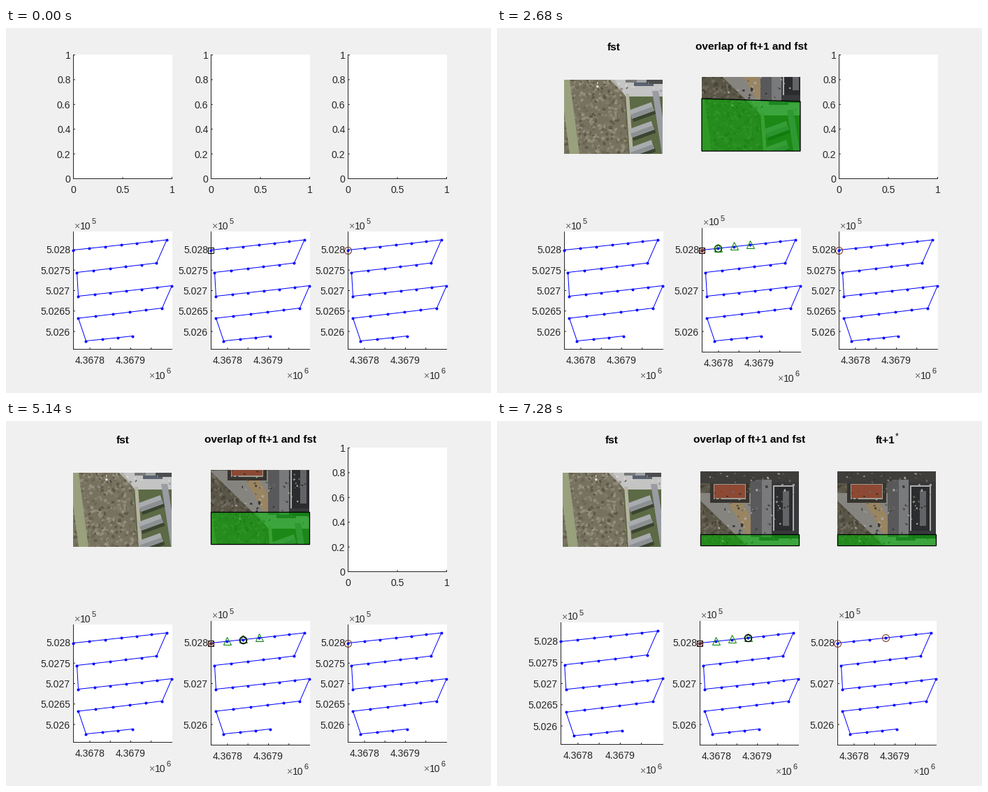
Animation, 694 px wide and 522 px high, one loop 8000 ms. Source, as a matplotlib script:

```python
import numpy as np
import matplotlib.pyplot as plt
from matplotlib.animation import FuncAnimation
from matplotlib.collections import PolyCollection
from matplotlib.patches import Polygon, Rectangle

W, H, DPI = 694, 522, 100
PX = 72 / DPI
LOOP, STEP = 8000, 40
STARTS = (1400, 3530, 6210)
SIDE, VIEW_H = 141, 106
INK, BLUE, GREEN, BROWN = "#262626", "#0000ff", "#008000", "#6b2a1a"

plt.rcParams["font.family"] = "Liberation Sans"
fig = plt.figure(figsize=(W / DPI, H / DPI), dpi=DPI, facecolor="#f0f0f0")
ax = fig.add_axes([0, 0, 1, 1])
ax.set_xlim(-0.5, W - 0.5)
ax.set_ylim(H - 0.5, -0.5)
ax.axis("off")

scenes = [[] for _ in range(4)]
current = scenes[0]
layer = 0


def add(artist):
    global layer
    layer += 1
    artist.set_zorder(layer)
    artist.set_visible(False)
    current.append(artist)
    return artist


def text(x, y, s, ha="center", size=14, weight="normal", color=INK):
    add(ax.text(x, y, s, ha=ha, va="baseline", fontsize=size * PX,
                weight=weight, color=color))


def title(x, s):
    text(x, 31, s, size=15.4, weight="bold", color="black")


def line(xs, ys, color=INK, **kw):
    add(ax.plot(xs, ys, color=color, lw=PX, snap=False, **kw)[0])


def mark(p, shape, color="black", size=10, width=1):
    add(ax.plot(p[0], p[1], shape, ms=size * PX, mfc="none", mec=color,
                mew=width * PX, snap=False)[0])


def frame(x0, w, top, bottom, xticks, yticks):
    add(ax.add_patch(Rectangle((x0 - 0.5, top - 0.5), w + 1, bottom - top + 1,
                               fc="white", lw=0, snap=False)))
    line([x0, x0], [top, bottom])
    line([x0, x0 + w], [bottom, bottom])
    for x in xticks:
        line([x, x], [bottom, bottom - 2])
    for y in yticks:
        line([x0, x0 + 2], [y, y])


def empty_axes(x0):
    xs, ys = np.linspace(x0, x0 + SIDE, 3), np.linspace(215, 38, 6)
    frame(x0, SIDE, 38, 215, xs, ys)
    for i, x in enumerate(xs):
        text(x, 235, f"{i / 2:g}")
    for i, y in enumerate(ys):
        text(x0 - 4, y + 5.5, f"{i / 5:g}", "right")


def sweep(x0, y0, x1, y1, n):
    """One pass of the flight, drifting slightly to the right."""
    t = np.linspace(0, 1, n)
    return np.column_stack([x0 + (x1 - x0) * t + 1.5 * np.sin(np.pi * t),
                            y0 + (y1 - y0) * t])


# Relative to the middle of the left axis
ROUTE = np.vstack([sweep(0, -58, 133.5, -72.5, 7),
                   sweep(119, -39.5, 5, -26, 6),
                   sweep(7, 8, 141, -7, 7),
                   sweep(127, 25, 7, 39.5, 6),
                   sweep(18, 72, 84.5, 65, 4)])


def power(x, y, exponent):
    text(x, y, "×", "left", color="#666666")
    text(x + 8.5, y, "10", "left")
    text(x + 25.5, y - 7, exponent, "left", 11)


def route_axes(x0, w=SIDE, top=291, bottom=459, every=1):
    """Draw the flight route; return its points in stage pixels."""
    k = w / SIDE
    pts = ROUTE * k + (x0, 375)
    xs = x0 + (23.5 + 29.25 * np.arange(4)) * k
    ys = 375 + 29.25 * k * np.arange(-2, 3, every)
    frame(x0, w, top, bottom, xs, ys)
    for i, x in enumerate(xs[::2]):
        text(x, bottom + 20.5, f"{4.3678 + i / 1e4:.4f}")
    for i, y in enumerate(ys):
        text(x0 - 4.5, y + 5.5, f"{5.028 - 0.0005 * every * i:g}", "right")
    power(x0 + 1, top - 4, "5")
    power(x0 + w - 33, bottom + 42, "6")
    line(*pts.T, color=BLUE, marker="o", ms=4 * PX, mew=0)
    return pts


def candidates(pts, active):
    """Start square, tried photos as triangles, the current one circled."""
    for shape, color in (("s", "black"), ("x", BROWN), ("+", BROWN)):
        mark(pts[0], shape, color, 8)
    for p in pts[1:4]:
        mark(p - (0, 1.5), "^", GREEN, 11)
    mark(pts[active], "o", "#004d00" if active == 1 else "black", 10, 1.5)


# Aerial ground: one strip of land, each view shows a window of it

def band(x, w, y0, y1, lean=0):
    return [(x, y0), (x + w, y0), (x + w + lean, y1), (x + lean, y1)]


def block(cx, cy, w, h, deg):
    a = np.radians(deg)
    u = np.array([np.cos(a), np.sin(a)]) * w / 2
    v = np.array([-np.sin(a), np.cos(a)]) * h / 2
    return [(cx, cy) + i * u + j * v
            for i, j in ((-1, -1), (1, -1), (1, 1), (-1, 1))]


def specks(seed, n, xs, ys, sizes, tones):
    rng = np.random.default_rng(seed)
    return [(rng.choice(tones),
             block(rng.uniform(*xs), rng.uniform(*ys), rng.uniform(*sizes),
                   rng.uniform(*sizes), rng.uniform(0, 90)))
            for _ in range(n)]


def build_land():
    land = [("#77725f", band(-20, 200, -110, 120))]
    land += specks(2, 700, (0, 95), (-70, 106), (2, 5),
                   ("#5e5947", "#8d8774", "#6b6652", "#7f7a68", "#958f7e"))
    land += [
        ("#98a07c", band(-6, 14, 0, 106, 14)),
        ("#b3b1aa", [(5, -59), (98, -59), (98, 24), (90, 24)]),
        ("#cdb283", band(56, 20, -45, 0, 26)),
        ("#55534f", band(0, 160, -110, -73)),
        ("#4a4640", band(30, 56, -73, -45)),
        ("#d5d0c8", band(35, 46, -72, -50)),
        ("#bd6245", band(36, 44, -71, -52)),
        ("#5c6a45", band(86, 60, 20, 106, 6)),
        ("#c3c4c3", band(72, 80, 0, 24, 16)),
        ("#5a6270", band(100, 28, 0, 9)),
        ("#b9b3a4", band(88, 5, 20, 106, 6)),
        ("#9a9ca3", band(126, 9, 16, 106, 14)),
        ("#77787a", band(88, 16, -78, 4)),
        ("#a2a3a5", band(104, 14, -78, 4)),
        ("#4c4d50", band(118, 50, -75, 6)),
        ("#e8e8e8", band(120, 30, -70, -5)),
        ("#3a3b3d", band(122, 26, -68, -5)),
        ("#85868a", band(134, 9, -62, -12)),
    ]
    for y in range(44, 100, 27):
        land += [("#3a4430", block(113, y + 4, 34, 14, -20)),
                 ("#a9acae", block(111, y, 34, 13, -20)),
                 ("#8d9093", block(112, y + 3, 34, 6, -20))]
    land += specks(5, 130, (30, 150), (-88, 16), (1, 3.5),
                   ("#e2e0d8", "#4b4945", "#8d8b86"))
    return land


TONES, SHAPES = zip(*build_land())


def view(x, y, scroll=0, dx=0, shade=0.25, tilt=None):
    """Window onto the land; a tilt value adds the green overlap."""
    x, y = x - 0.5, y - 0.5
    shapes = [np.array(s) + (x + dx, y + scroll) for s in SHAPES]
    land = add(ax.add_collection(
        PolyCollection(shapes, facecolors=TONES, linewidths=0), autolim=False))
    cover = add(ax.add_patch(Rectangle((x, y), SIDE, VIEW_H, lw=0,
                                       fc=(0, 0, 0, shade))))
    land.set_clip_path(cover)
    if tilt is not None:
        area = [(x, y + scroll), (x + SIDE, y + scroll + tilt),
                (x + SIDE, y + VIEW_H), (x, y + VIEW_H)]
        add(ax.add_patch(Polygon(area, fc=(0, 0.7, 0, 0.58), ec="black",
                                 lw=1.3 * PX, joinstyle="miter")))


# Empty axes above, plain routes below
for x in (96, 293, 489):
    empty_axes(x)
route_axes(96)
mark(route_axes(293)[0], "s", size=8)
mark(route_axes(489)[0], "o", BROWN)

# The overlap shrinks as the next photo is tried
for n, (scroll, dx, tilt) in enumerate([(31, -4, 4), (60, -6, 0)], 1):
    current = scenes[n]
    title(166.5, "fst")
    title(364, "overlap of ft+1 and fst")
    view(96, 74, shade=0)
    view(293, 70, scroll, dx, tilt=tilt)
    empty_axes(489)
    route_axes(96)
    candidates(route_axes(293, top=286, bottom=463, every=2), n)
    mark(route_axes(489)[0], "o", BROWN)

# The chosen photo
current = scenes[3]
title(163.5, "fst")
title(361, "overlap of ft+1 and fst")
title(555, "ft+1")
text(572, 25, "*", size=12, color="black")
view(94, 74, shade=0)
for x in (291, 487):
    view(x, 72, 90, -16, tilt=0)
route_axes(91, 146, 288, 462)
candidates(route_axes(290, top=286, bottom=463, every=2), 3)
chosen = route_axes(487, top=286, bottom=463, every=2)
for p in chosen[[0, 3]]:
    mark(p, "o", BROWN)


def update(n):
    shown = np.searchsorted(STARTS, n * STEP + STEP / 2)
    for i, scene in enumerate(scenes):
        for artist in scene:
            artist.set_visible(i == shown)
    return []


anim = FuncAnimation(fig, update, frames=LOOP // STEP, interval=STEP,
                     repeat=True, repeat_delay=0, blit=False)
plt.show()
```
